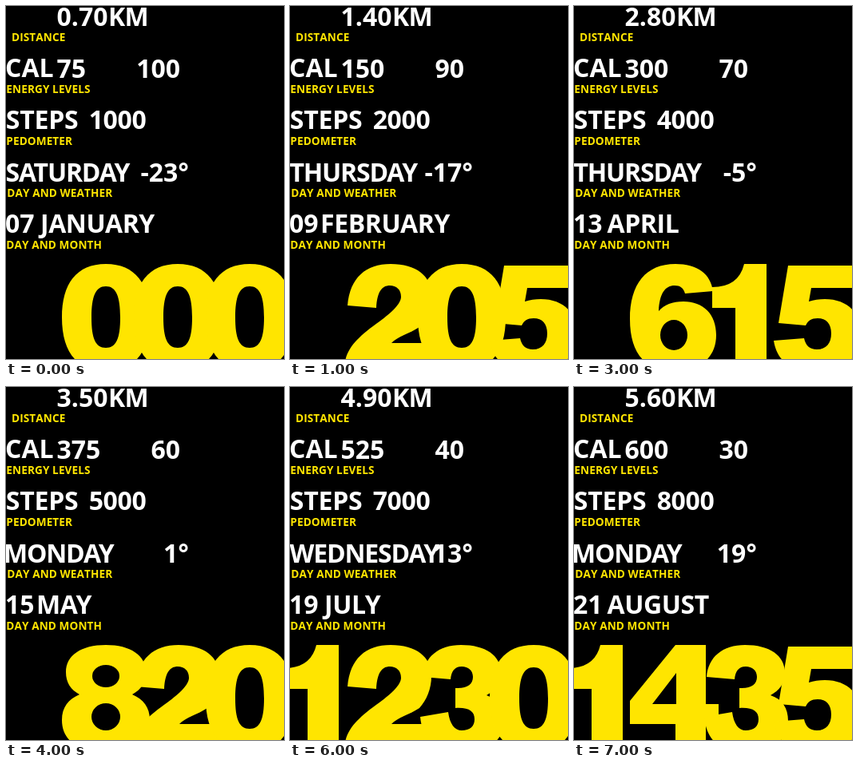
Write an HTML page with a canvas that moves like this. It is 348 by 442 pixels and loops after 8000 ms.

```html
<!DOCTYPE html>
<html lang="en">
<head>
<meta charset="utf-8">
<style>
  html, body { margin: 0; width: 100%; height: 100%; overflow: hidden; background: #000; }
  canvas { display: block; }
</style>
</head>
<body>
<canvas id="stage" width="348" height="442"></canvas>
<script>
const ctx = document.getElementById('stage').getContext('2d');
const YELLOW = '#ffe500';
const WHITE = '#fff';
const DAYS = ['SUNDAY', 'MONDAY', 'TUESDAY', 'WEDNESDAY', 'THURSDAY', 'FRIDAY', 'SATURDAY'];
const MONTHS = ['JANUARY', 'FEBRUARY', 'MARCH', 'APRIL', 'MAY', 'JUNE', 'JULY', 'AUGUST'];

// Heavy clock digits, drawn from y = 0 down past the bottom edge.
const DIGITS = {
  0: 'M55 0C18 0 0 25 0 67S18 134 55 134 110 109 110 67 92 0 55 0ZM55 28C68 28 73 41 73 67S68 105 55 105 37 93 37 67 42 28 55 28Z',
  1: 'M81 0V132H42V55H13V29Q46 29 53 0Z',
  2: 'M2 52C5 17 25 0 56 0C88 0 107 15 107 39C107 55 101 69 92 79C80 87 64 91 57 99H107V132H-2C-2 107 14 92 42 72C57 61 69 50 69 41C69 32 63 27 55 27C45 27 39 35 38 55Z',
  3: 'M6 40C8 15 26 0 54 0C85 0 104 13 104 35C104 48 97 57 86 63C101 68 108 79 108 95C108 120 88 134 55 134C24 134 6 121 3 90L38 84C40 99 46 107 55 107C65 107 71 102 71 93C71 83 64 78 47 79V54C62 55 69 49 69 40C69 32 63 27 55 27C46 27 42 33 41 43Z',
  4: 'M95 0V74H111V99H95V132H57V99H0V70L57 0ZM58 35L28 74H58Z',
  5: 'M18 2H104V30H47L44 47Q53 44 64 44C92 44 109 61 109 87C109 116 90 134 54 134C20 134 4 121 0 96L38 93C40 102 45 107 54 107C66 107 72 99 72 87C72 75 66 68 55 68C47 68 43 71 40 77L6 74Z',
  6: 'M104 34C101 12 84 0 57 0C20 0 0 25 0 69C0 112 19 134 56 134C88 134 108 117 108 89C108 63 92 47 67 47C53 47 43 51 36 59C37 37 44 27 56 27C63 27 67 30 69 37ZM55 70A17 19 0 1 1 55 108A17 19 0 1 1 55 70Z',
  8: 'M55 0C86 0 105 13 105 34C105 47 99 56 88 62C102 68 110 78 110 94C110 120 89 134 55 134S0 120 0 94C0 78 8 68 22 62C11 56 5 47 5 34C5 13 24 0 55 0ZM55 25A17 14 0 1 1 55 53A17 14 0 1 1 55 25ZM55 73A18 17 0 1 1 55 107A18 17 0 1 1 55 73Z'
};
const shapes = Object.fromEntries(Object.entries(DIGITS).map(([d, path]) => [d, new Path2D(path)]));

function write(text, x, y, { align = 'left', size = 32, color = WHITE, spacing = 0, kerning = 'normal' } = {}) {
  ctx.font = `bold ${size}px "Open Sans", "Noto Sans", sans-serif`;
  ctx.letterSpacing = spacing + 'px';
  ctx.fontKerning = kerning;
  ctx.textAlign = align;
  ctx.fillStyle = color;
  ctx.fillText(text, x, y);
}

function label(text, x, y) {
  write(text, x, y, { size: 13.6, color: YELLOW, spacing: 0.1, kerning: 'none' });
}

function clock(text) {
  ctx.fillStyle = YELLOW;
  [...text].forEach((digit, i) => {
    ctx.save();
    ctx.translate(340 - 90 * (text.length - i), 323);
    ctx.fill(shapes[digit], 'evenodd');
    ctx.restore();
  });
}

function draw(step) {
  const n = step + 1;
  const date = 7 + 2 * step;
  const month = MONTHS[step];
  const weekday = DAYS[new Date(2017, step, date).getDay()];
  const monthX = { J: 43, A: 41.5 }[month[0]] ?? 38;
  const right = { align: 'right' };

  ctx.fillStyle = '#000';
  ctx.fillRect(0, 0, 348, 442);

  write((0.7 * n).toFixed(2), 63.5, 25);
  write('KM', 128, 25, { spacing: -0.8 });
  label('DISTANCE', 7, 44);

  write('CAL', -1, 89);
  write(75 * n, 63.5, 90);
  write(100 - 10 * step, 218, 90, right);
  label('ENERGY LEVELS', 0.3, 109);

  write('STEPS', -0.3, 154, { spacing: -0.2 });
  write(1000 * n, 175.5, 154, { align: 'right', spacing: -0.3 });
  label('PEDOMETER', 0.3, 174);

  write(weekday, weekday[0] === 'M' ? -3 : -0.5, 220, { spacing: -1.2 });
  write(6 * step - 23 + '°', 229, 220, right);
  label('DAY AND WEATHER', 1.3, 239);

  write(String(date).padStart(2, '0'), -1, 284);
  write(month, monthX, 284, { spacing: -0.4 });
  label('DAY AND MONTH', 0.3, 304);

  clock(String(205 * step).padStart(3, '0'));
}

const start = performance.now();
function tick() {
  draw(Math.floor((performance.now() - start) / 1000) % 8);
  requestAnimationFrame(tick);
}
tick();
</script>
</body>
</html>
```
